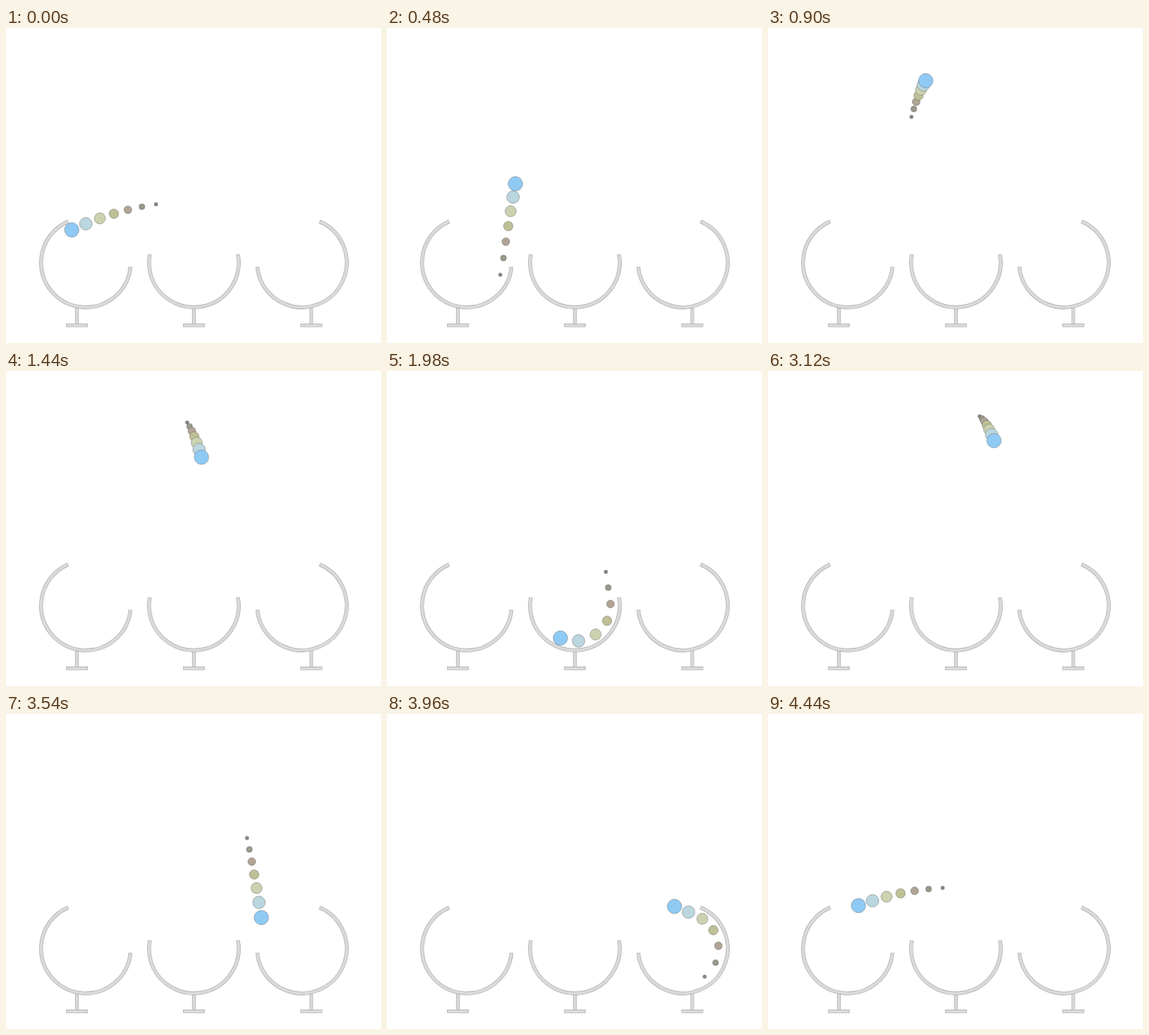
These frames come from a looping animation (500 px wide and 421 px high, 4500 ms). An HTML page with a canvas:

```html
<!DOCTYPE html>
<html lang="en">
<head>
<meta charset="utf-8">
<title>Ball and cups</title>
<style>
  html, body { margin: 0; width: 100%; height: 100%; overflow: hidden; background: #fff; }
  canvas { display: block; }
</style>
</head>
<body>
<canvas id="stage" width="500" height="421"></canvas>
<script>
const ctx = document.getElementById('stage').getContext('2d');
const LOOP = 4500, TICK = 60;
const FLOOR_Y = 313.5, TRACK = 47.5, RING = 59.75;
const DT = 0.01;            // path resolution, in steps with gravity 1
const DELAY = 1 / DT;       // samples between the balls of the trail
const LAG = 0.07 / DT;      // samples before the first ball enters the left cup
const REST_Y = 54;          // height at which the ball would have no speed
const HIGH = 57.6, LOW = 232;
const rad = deg => deg * Math.PI / 180;

const cups = [
  { x: 106.5, from: 6, to: 246.2, stem: 94.5 },
  { x: 250.5, from: -10, to: 190, stem: 250.5 },
  { x: 394.5, from: -66.2, to: 174, stem: 407 }
];

const trail = [
  ['#8fcaf5', 9.6], ['#bad6df', 8.4], ['#cbd2b0', 7.4], ['#bfc095', 6.3],
  ['#b1a495', 5.2], ['#9b998b', 3.9], ['#868686', 2.4]
];

// The path is sampled at equal time intervals.
const path = [];
const onTrack = (cup, deg) => ({
  x: cup.x + TRACK * Math.cos(rad(deg)),
  y: FLOOR_Y + TRACK * Math.sin(rad(deg))
});

function roll(cup, from, to) {
  const dir = Math.sign(to - from);
  for (let a = from; (to - a) * dir > 0;) {
    const p = onTrack(cup, a);
    path.push(p);
    a += dir * Math.sqrt(2 * (p.y - REST_Y)) / TRACK * DT * 180 / Math.PI;
  }
}

function fly(a, b, apex) {
  const rise = Math.sqrt(2 * (a.y - apex));
  const total = rise + Math.sqrt(2 * (b.y - apex));
  for (let t = 0; t < total; t += DT) {
    path.push({ x: a.x + (b.x - a.x) * t / total, y: apex + (t - rise) ** 2 / 2 });
  }
}

const [left, middle, right] = cups;
roll(left, 245, 8);
fly(onTrack(left, 8), onTrack(middle, -8), HIGH);
roll(middle, -8, 188);
fly(onTrack(middle, 188), onTrack(right, 172), HIGH);
roll(right, 172, -65);
fly(onTrack(right, -65), onTrack(left, 245), LOW);

function strokeArc(cup, width, color, extra) {
  ctx.beginPath();
  ctx.arc(cup.x, FLOOR_Y, RING, rad(cup.from - extra), rad(cup.to + extra));
  ctx.lineWidth = width;
  ctx.strokeStyle = color;
  ctx.stroke();
}

function box(x, y, w, h) {
  ctx.fillStyle = '#a6a6a6';
  ctx.fillRect(x - w / 2, y, w, h);
  ctx.fillStyle = '#dadada';
  ctx.fillRect(x - w / 2 + 0.6, y + 0.6, w - 1.2, h - 1.2);
}

function drawCup(cup) {
  box(cup.stem, 373, 4.6, 23);
  box(cup.stem, 395, 29, 4.6);
  strokeArc(cup, 5, '#a6a6a6', 0.5);
  strokeArc(cup, 3.8, '#dadada', 0);
}

function drawBall(p, color, r) {
  ctx.beginPath();
  ctx.arc(p.x, p.y, r, 0, 2 * Math.PI);
  ctx.fillStyle = color;
  ctx.fill();
  ctx.lineWidth = 0.6;
  ctx.strokeStyle = 'rgba(100, 100, 100, 0.75)';
  ctx.stroke();
}

function draw(time) {
  ctx.fillStyle = '#fff';
  ctx.fillRect(0, 0, 500, 421);
  cups.forEach(drawCup);
  const head = time / LOOP * path.length - LAG;
  for (let i = trail.length - 1; i >= 0; i--) {
    const at = Math.floor(head - i * DELAY + path.length) % path.length;
    drawBall(path[at], ...trail[i]);
  }
}

const start = performance.now();
function frame() {
  const t = (performance.now() - start) % LOOP;
  draw(Math.floor(t / TICK) * TICK);
  requestAnimationFrame(frame);
}
frame();
</script>
</body>
</html>
```
